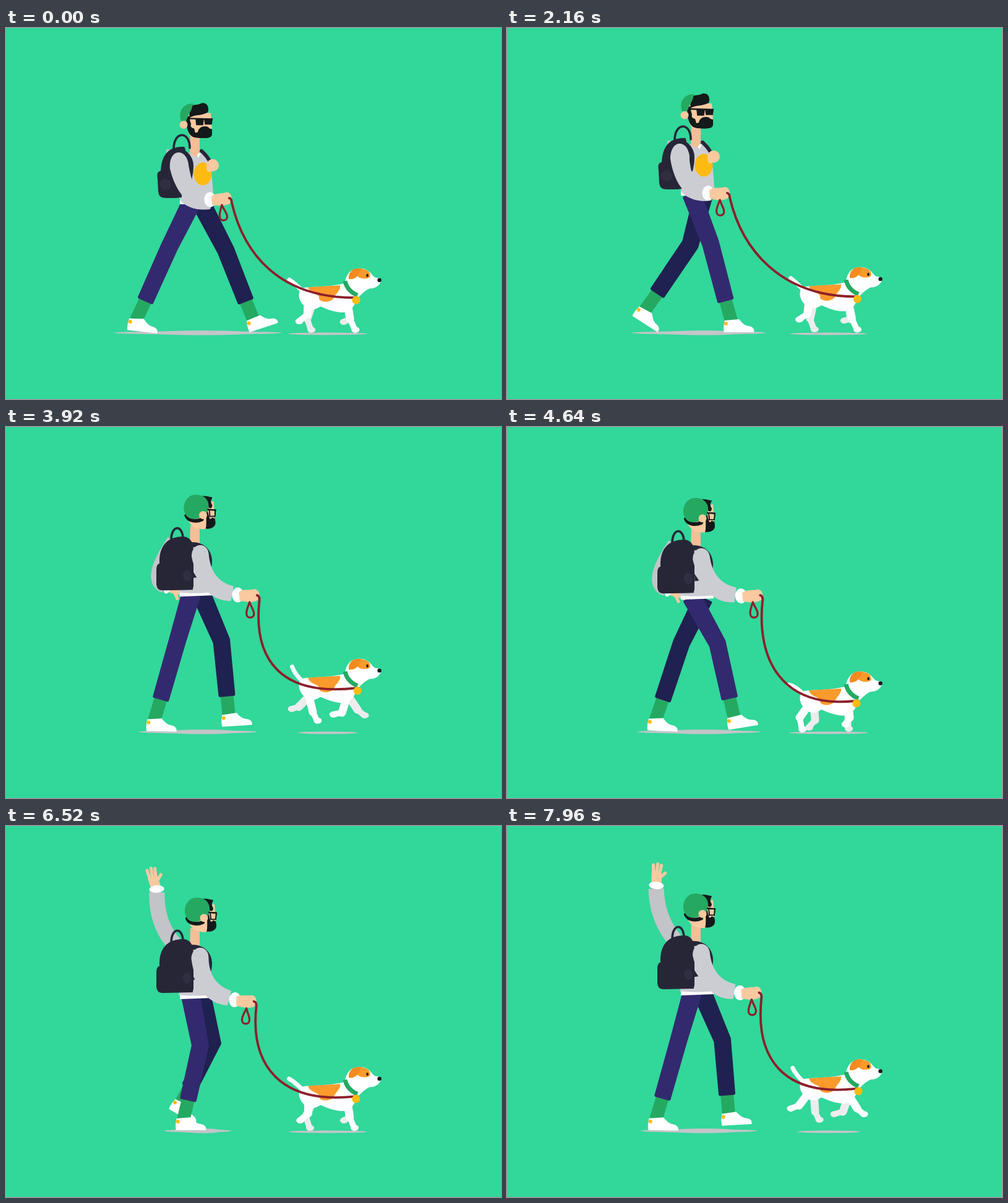
These frames come from a looping animation (800 px wide and 600 px high, 8000 ms). An HTML page:

```html
<!DOCTYPE html>
<html lang="en">
<head>
<meta charset="utf-8">
<title>Walking the dog</title>
<style>
  html, body { margin: 0; width: 100%; height: 100%; overflow: hidden; background: #32d79a; }
  svg { display: block; width: 100vw; height: 100vh; }
</style>
</head>
<body>
<svg id="stage" viewBox="0 0 800 600" fill="none"></svg>
<script>
const LOOP = 8000, STEP = 674, TROT = 543;
const C = {
  skin: '#fbc9a0', neck: '#f6be97', hair: '#14191a', cap: '#25a961', grey: '#cccdd3',
  farGrey: '#c3c4c8', pack: '#272637', mark: '#302f42', near: '#33296f', far: '#1f2150',
  leash: '#8d1f2b', yellow: '#fdbb12', orange: '#fc9a2c', ear: '#f48a20', paw: '#ececee', shade: '#c4c5c8'
};
const stage = document.getElementById('stage');

const lerp = (a, b, k) => a + (b - a) * k;
const ease = (t, a, b) => { const x = Math.min(1, Math.max(0, (t - a) / (b - a))); return x * x * (3 - 2 * x); };
const mod = (x, n) => ((x % n) + n) % n;
const wave = x => Math.cos(x * 2 * Math.PI);

// Smooth periodic interpolation without overshoot. Rows are [x, ...values].
function cycle(rows, span, x) {
  x = mod(x, span);
  const n = rows.length;
  const at = i => rows[mod(i, n)];
  const pos = i => at(i)[0] + Math.floor(i / n) * span;
  let i = n - 1;
  while (i >= 0 && rows[i][0] > x) i--;
  const gap = j => pos(j + 1) - pos(j);
  const h = gap(i), u = (x - pos(i)) / h;
  return rows[0].slice(1).map((_, c) => {
    const val = j => at(j)[c + 1];
    const slope = j => (val(j + 1) - val(j)) / gap(j);
    const tan = j => { const a = slope(j - 1), b = slope(j); return a * b > 0 ? 2 * a * b / (a + b) : 0; };
    const u2 = u * u, u3 = u2 * u;
    return (2 * u3 - 3 * u2 + 1) * val(i) + (u3 - 2 * u2 + u) * h * tan(i)
      + (3 * u2 - 2 * u3) * val(i + 1) + (u3 - u2) * h * tan(i + 1);
  });
}

// Blend two paths that share one structure.
function mix(a, b, k) {
  const nums = b.match(/-?[\d.]+/g);
  let i = 0;
  return a.replace(/-?[\d.]+/g, v => lerp(+v, +nums[i++], k).toFixed(2));
}

const fill = (d, c, more = '') => `<path d="${d}" fill="${c}" ${more}/>`;
const line = (d, c, w, cap = 'round') =>
  `<path d="${d}" stroke="${c}" stroke-width="${w}" stroke-linecap="${cap}" stroke-linejoin="round"/>`;
const oval = (x, y, rx, ry, c) => `<ellipse cx="${x}" cy="${y}" rx="${Math.max(0, rx)}" ry="${ry}" fill="${c}"/>`;
const group = (tf, s) => `<g transform="${tf}">${s}</g>`;

// phase, knee x y, ankle x y, foot angle; 0 to 1 on the ground, 1 to 2 in the air
const STRIDE = [
  [0, 345, 359, 390, 472, -18], [.205, 329, 348, 363, 475, 0], [.674, 314, 355, 287, 475, 0],
  [.748, 291, 352, 268, 475, 0], [.81, 278, 345, 241, 475, 1], [.899, 271, 350, 228, 474, 3],
  [1, 264, 354, 210, 473, 6], [1.205, 286, 350, 212, 458, 33], [1.674, 324, 350, 272, 449, 30],
  [1.748, 327, 350, 320, 468, 2], [1.81, 338, 346, 348, 467, -3], [1.884, 340, 350, 367, 471, -9]
];
// phase, body drop, shadow width
const BOB = [
  [0, 14, 271], [.205, 0, 217], [.45, 3, 130], [.674, 7, 108],
  [.748, -1, 135], [.81, 1, 188], [.89, 6.5, 200]
];
// time, head shift, leash arm angle
const SWAY = [
  [0, 0, 0], [1280, 2, 0], [2160, 0, 0], [3200, 5, 3], [4640, 0, 0], [6520, 4, 7], [7960, 0, 0]
];
// phase, knee x y, paw x y
const HIND = [
  [0, 487, 463, 473, 474], [.045, 498, 474, 487, 486], [.16, 498, 462, 504, 475],
  [.357, 489, 460, 499, 475], [.393, 497, 466, 504, 482], [.5, 487, 470, 493, 488],
  [.545, 473, 470, 477, 489], [.66, 472, 452, 458, 457], [.857, 480, 457, 471, 455], [.893, 482, 460, 468, 463]
];
const FRONT = [
  [0, 556, 470, 564, 488], [.045, 552, 472, 552, 488], [.16, 543, 462, 528, 466],
  [.357, 544, 462, 529, 464], [.393, 552, 466, 538, 467], [.5, 556, 471, 545, 475],
  [.545, 554, 470, 546, 481], [.66, 566, 457, 576, 466], [.857, 571, 461, 582, 470], [.893, 563, 469, 570, 480]
];
const DOG_BOB = [[0, 0], [.09, 7], [.32, -11], [.5, -14], [.714, -12], [.786, -7]];

const SHOE = 'M-11 -2C-13 6 -13 12 -12 17L36 17C38 12 34 8 28 7C20 6 16 0 12 -4Z';

function leg(phase, hipX, hipY, shift, color) {
  let [kx, ky, ax, ay, turn] = cycle(STRIDE, 2, phase);
  kx += shift; ax += shift;
  const hx = lerp(kx, ax, .71), hy = lerp(ky, ay, .72);
  const pts = [[hipX, hipY, 13], [kx, ky, 11.5], [hx, hy, 11]];
  const side = s => pts.map(([x, y, w], i) => {
    const a = pts[Math.max(0, i - 1)], b = pts[Math.min(2, i + 1)];
    const dx = b[0] - a[0], dy = b[1] - a[1], len = Math.hypot(dx, dy);
    return `${x + s * w * dy / len} ${y - s * w * dx / len}`;
  });
  return line(`M${hx} ${hy}L${ax} ${ay}`, C.cap, 21, 'butt')
    + group(`translate(${ax} ${ay}) rotate(${turn})`, fill(SHOE, '#fff') + oval(-9, 3, 3, 3, C.yellow))
    + fill('M' + [...side(-1), ...side(1).reverse()].join('L') + 'Z', color,
      `stroke="${color}" stroke-width="5" stroke-linejoin="round"`);
}

function farArm(t, k) {
  const up = ease(t, 4950, 5600), w = wave((t - 7960) / 576) * up;
  const polar = (p, deg, r) => [p[0] + r * Math.cos(deg * Math.PI / 180), p[1] + r * Math.sin(deg * Math.PI / 180)];
  const s = [272, 184];
  const elbow = polar(s, lerp(lerp(100, 124, k), 229, up), lerp(lerp(55, 74, k), 45, up));
  const aim = lerp(20, 270, up);
  const wrist = polar(elbow, aim, lerp(28, 50, up));
  wrist[0] -= 1.5 * w;
  const hand = fill('M-8 2L-9 -18C-8 -23 6 -24 8 -17L8 2Z', C.skin)
    + line('M-6 -18L-7 -32M-1 -19L0 -34M4 -18L6 -32M5 -12L13 -20', C.skin, 5);
  return group(`translate(${wrist}) rotate(${aim + 90 - 5 * up + 9 * w})`, group('translate(0 -6)', hand))
    + line(`M${s}Q${elbow} ${wrist}`, C.farGrey, 25, 'butt')
    + group(`translate(${wrist}) rotate(${aim + 90 + 4 * w})`, oval(0, -5, 12, 6, '#fff'));
}

function head(k) {
  const m = (a, b) => mix(a, b, k);
  const lens = m('M307 132L319 132L318 141L308 141Z', 'M326 132L336 133L335 143L327 143Z');
  const lens2 = m('M321 132L333 132L332 140L322 140Z', 'M326 132L336 133L335 143L327 143Z');
  const glass = `fill-opacity="${1 - k}" stroke="${C.hair}" stroke-width="1.6"`;
  return fill(m('M293 122L331 122L333 150C333 160 325 162 312 162L300 162C293 156 291 140 293 122Z',
      'M290 135L333 118L335 150C336 160 328 163 315 164L305 162C295 158 290 150 290 135Z'), C.skin)
    + line(m('M294 130C294 135 295 138 296 140', 'M289 142C293 151 305 152 314 148'), C.hair, 6)
    + fill(m('M292 127L297 130C297 145 300 146 304 147L306 154L310 153C311 143 325 141 329 147L333 148L333 156C333 164 320 163 308 162C296 162 290 148 292 127Z',
      'M321 130L323 128C324 140 325 140 326 144L327 147L329 147C330 145 332 144 333 146L335 146L336 152C337 160 329 164 320 163C322 158 321 148 321 130Z'), C.hair)
    + fill(m('M297 113C300 107 310 110 316 106C326 104 329 115 326 121C316 127 304 124 296 130Z',
      'M312 111C318 108 326 112 331 112C329 118 327 118 331 125C330 135 322 128 318 118Z'), C.hair)
    + fill(m('M283 135C277 118 288 106 303 107C300 112 301 115 299 118C297 122 294 126 293 130C293 134 287 136 283 135Z',
      'M290 143C279 130 287 108 304 108C320 108 326 118 325 129C325 135 322 139 316 140C310 148 297 150 290 143Z'), C.cap)
    + oval(lerp(287, 316, k), 141, 6.5, 6.5, C.skin)
    + line(m('M297 131L334 132', 'M323 132L337 133'), C.hair, 2.4, 'butt')
    + fill(lens, C.hair, glass) + fill(lens2, C.hair, glass);
}

function torso(k) {
  const m = (a, b) => mix(a, b, k);
  const gone = Math.min(1, k / .55);
  return fill(m('M281 264L296 266L296 271L281 271Z', 'M281 265L334 265L334 271L281 273Z'), '#fff')
    + fill(m('M283 192C290 184 300 188 305 194C312 190 316 184 322 186C330 200 334 225 335 262L330 279C310 282 290 276 281 264Z',
      'M300 190C305 186 308 184 312 186C318 188 322 192 324 195C330 205 333 235 333 266L334 266C315 268 295 268 279 266Z'), C.grey)
    + fill('M306 188L315 188L311 196Z', '#fff', `opacity="${1 - gone}"`)
    + fill('M298 158L313 158L313 186L306 195L297 188Z', C.neck)
    + oval(lerp(318, 332, gone), 222, 14.5 * (1 - gone), 18.5, C.yellow)
    + line(m('M316 185C322 190 328 198 331 205', 'M318 200C320 205 322 208 322 212'), C.pack, 6)
    + oval(lerp(334, 324, gone), 208, 10 * (1 - gone), 10, C.skin)
    + oval(lerp(329, 322, gone), 213, 5 * (1 - gone), 6, C.skin)
    + line(m('M271 182C271 152 297 152 297 180', 'M267 182C267 156 286 156 286 180'), C.pack, 3.6)
    + fill(m('M250 222C250 192 262 177 288 178C292 182 290 200 288 215L284 255C283 260 280 261 270 261L258 261Z',
      'M248 218C247 190 262 175 288 176C300 178 303 188 303 202L303 255C303 261 300 262 290 262L258 262Z'), C.pack)
    + fill(m('M250 217C244 218 244 224 245 230L246 250C247 260 252 261 260 261L284 260L284 218Z',
      'M250 219C243 220 243 226 243 232L243 253C244 262 248 263 256 263L302 262L302 219Z'), C.pack)
    + oval(lerp(258, 293, k), 239, lerp(9, 7, k), 9, C.mark)
    + line(m('M268 191C285 177 300 195 299 210C299 220 297 226 296 231', 'M300 189C318 188 328 200 329 214C329 221 329 225 327 228'), C.pack, 8, 'butt');
}

function nearArm(k, hx, hy) {
  const hand = 'M-30 -6C-22 -12 -12 -8 -5 -11C4 -10 5 2 0 7C-7 12 -22 10 -29 8Z';
  return fill(mix('M264 212C264 179 292 181 294 205C297 235 302 258 322 257L326 279C300 284 272 262 264 212Z',
      'M300 208C300 184 327 184 328 206C331 232 345 250 369 255L365 279C330 280 310 252 300 208Z', k), C.grey)
    + fill(mix('M284 235L284 235L284 235Z', 'M302 231L309 242L302 243Z', k), C.pack)
    + group(`translate(${hx} ${hy})`, oval(-32, -1, 9.5, 12, '#fff') + fill(hand, C.skin));
}

function dogLeg(keys, phase, x, y, color) {
  const [kx, ky, fx, fy] = cycle(keys, 1, phase);
  return line(`M${x} ${y}L${kx} ${ky}`, color, 13)
    + line(`M${kx} ${ky}L${fx} ${fy}`, color, 9.5)
    + oval(fx + 1, fy, 6.5, 4.8, color);
}

function dog(ph, d) {
  const lift = -d / 12;
  const body = line(`M${458 + 4 * lift} ${407 - 5 * lift}Q466 412 479 425`, '#fff', 7)
    + fill('M488 419C510 418 530 417 546 413L568 432C566 445 560 455 550 459C537 462 520 455 508 450C500 456 490 457 482 449C472 441 470 424 480 420Z', '#fff')
    + fill('M488 419L540 416C541 424 534 428 531 434C528 444 510 445 506 438C508 428 492 432 488 419Z', C.orange)
    + fill('M548 410C552 390 565 387 578 389C588 392 590 398 596 403L606 405C607 413 600 421 588 421C580 424 574 431 570 435Z', '#fff')
    + fill('M554 405C554 392 564 387 575 389C587 390 590 398 588 403C580 407 572 405 568 401C563 406 558 407 554 405Z', C.orange)
    + fill('M554 406C553 393 562 387 574 389C572 396 568 405 554 406Z', C.ear)
    + oval(584, 400, 1.8, 2.6, C.hair) + oval(603.5, 407.5, 3.2, 3.2, C.hair)
    + line('M548 409Q551 425 568 432', C.cap, 7, 'butt');
  return dogLeg(HIND, ph + .5, 496, 443 + d, C.paw) + dogLeg(FRONT, ph + .5, 552, 447 + d, C.paw)
    + dogLeg(HIND, ph, 488, 442 + d, '#fff') + dogLeg(FRONT, ph, 552, 446 + d, '#fff')
    + group(`translate(0 ${d})`, body);
}

function leash(k, x, y, d, p) {
  const path = `M${x - 1} ${y - 1}Q${x + 3} ${y} ${x + 3} ${y + 6}`
    + `C${x + lerp(22, -8, k)} ${y + lerp(88, 104, k)} ${lerp(440, 445, k)} ${lerp(436, 449, k) + d} 564 ${436 + d}`;
  const loop = group(`translate(${x - 13} ${y + 10}) rotate(${-8 * wave(p)})`,
    line('M0 0C-3 8 -7 14 -6 20C-5 27 6 27 6 19C6 13 2 8 0 0Z', C.leash, 3.2));
  return loop + line(path, C.leash, 3.8) + oval(566 - d / 6, 440 + d, 6.6, 6.6, C.yellow);
}

function scene(t) {
  const p = t / STEP, ph = t / TROT;
  const [bob, wide] = cycle(BOB, 1, p);
  const [shift, swing] = cycle(SWAY, LOOP, t);
  const [d] = cycle(DOG_BOB, 1, ph * 2);
  const k = ease(t, 2500, 3750), turn = ease(t, 2450, 3100);

  const hx = lerp(357, 408, k), hy = lerp(268, 270, k);
  const sx = lerp(280, 314, k), sy = 200, deg = swing - bob * .3;
  const a = deg * Math.PI / 180, rx = hx - sx, ry = hy - sy;
  const gripX = sx + rx * Math.cos(a) - ry * Math.sin(a);
  const gripY = sy + rx * Math.sin(a) + ry * Math.cos(a) + bob;

  return oval(310, 493, wide / 2, 2.6, C.shade) + oval(318, 493, wide * .27, 3.8, C.shade)
    + oval(520, 494.5, 64 + Math.min(0, d) * 1.15, 2, C.shade)
    + group(`translate(0 ${bob})`, farArm(t, k))
    + leg(p, 317, 272 + bob, 10, C.far)
    + leg(p - 1, 299, 270 + bob, 0, C.near)
    + group(`translate(0 ${bob})`, torso(k))
    + group(`translate(${shift} ${bob * 1.1})`, head(turn))
    + group(`translate(0 ${bob}) rotate(${deg} ${sx} ${sy})`, nearArm(k, hx, hy))
    + dog(ph, d)
    + leash(k, gripX, gripY, d, p);
}

function frame() {
  stage.innerHTML = scene(performance.now() % LOOP);
  requestAnimationFrame(frame);
}
frame();
</script>
</body>
</html>
```
